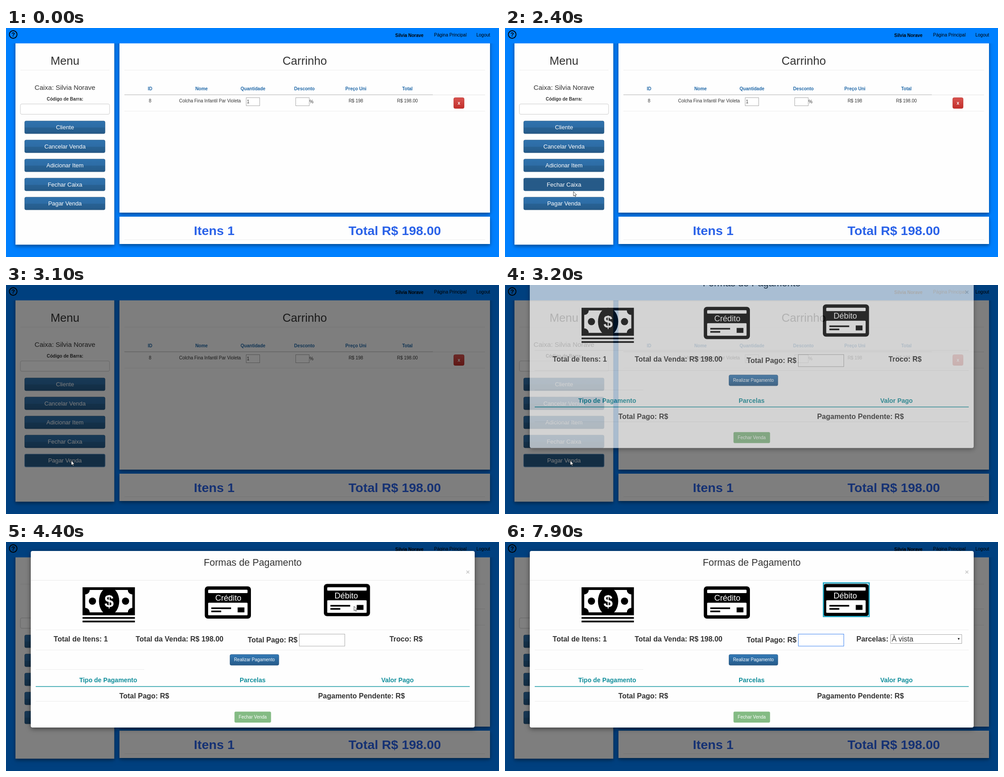
Write an HTML page that moves like this. It is 1095 px wide and 511 px high and loops after 8000 ms.

```html
<!DOCTYPE html>
<html lang="pt-BR">
<head>
<meta charset="utf-8">
<title>Caixa</title>
<style>
  html, body { margin: 0; width: 100%; height: 100%; overflow: hidden; background: #0080ff; }
  svg { display: block; width: 1095px; height: 511px; }
  text { font-family: "Liberation Sans", Arial, sans-serif; text-anchor: middle; fill: #333; white-space: pre; }
  .b { font-weight: bold; }
  .s { text-anchor: start; }
  .w { fill: #fff; }
  .k { fill: #000; }
  .link { fill: #2068a8; }
  .sum { fill: #2a62e8; }
  .teal { fill: #128f9c; }
  .panel { fill: #fefefe; filter: drop-shadow(0 3px 3px rgba(0,0,0,.3)) drop-shadow(0 3px 6px rgba(0,0,0,.2)); }
  .dialog { fill: #fefefe; filter: drop-shadow(0 3.6px 5.3px rgba(0,0,0,.5)); }
  .field { fill: #fff; stroke: #aaa; }
  .soft { fill: #fff; stroke: #ccc; }
  .menu { fill: url(#band); stroke: #245580; stroke-width: .7; }
  .menu.on { fill: #265a88; }
  .menu.focus { stroke: #5f93c4; stroke-width: 1.2; }
</style>
</head>
<body>
<svg id="stage" viewBox="0 0 1095 511"></svg>
<script>
const stage = document.getElementById('stage');

// Markup helpers
const text = (x, y, size, str, cls = '', more = '') =>
  `<text x="${x}" y="${y}" font-size="${size}" class="${cls}" ${more}>${str}</text>`;
const rect = (x, y, x2, y2, attrs) =>
  `<rect x="${x}" y="${y}" width="${x2 - x}" height="${y2 - y}" ${attrs}/>`;
const rule = (x, x2, y, color = '#ececec', w = 1) =>
  `<path d="M${x} ${y}H${x2}" stroke="${color}" stroke-width="${w}"/>`;
const gradient = (id, ...stops) =>
  `<linearGradient id="${id}" x2="0" y2="1">${stops.map(([o, c]) =>
    `<stop offset="${o}" stop-color="${c}"/>`).join('')}</linearGradient>`;

const CASHIER = 'Silvia Norave';
const ITEM = 'Colcha Fina Infantil Par Violeta';
const MENU = ['Cliente', 'Cancelar Venda', 'Adicionar Item', 'Fechar Caixa', 'Pagar Venda'];
const HEADS = ['ID', 'Nome', 'Quantidade', 'Desconto', 'Preço Uni', 'Total'];

const menuButton = (label, i) => {
  const y = 207.4 + i * 42.5;
  return rect(41.5, y, 220, y + 28.4, 'rx="3" class="menu"') + text(131, y + 18.8, 12.9, label, 'w');
};

const page = () => [
  rect(0, 0, 1095, 511, 'fill="#0080ff"'),
  rect(21, 20, 240.5, 483.5, 'class="panel"'),
  rect(252, 20, 1075, 412, 'class="panel"'),
  rect(252, 421, 1075, 482, 'class="panel"'),
  rect(0, 0, 1095, 34.3, 'fill="#0080ff"'),
  '<circle cx="16" cy="14.5" r="8.5" fill="none" stroke="#000" stroke-width="1.8"/>',
  text(16, 19.2, 13, '?', 'b k'),
  text(896, 20, 10, CASHIER, 'b k'),
  text(987, 18.7, 10, 'Página Principal', 'k'),
  text(1060, 18.7, 10, 'Logout', 'k'),

  text(131, 82, 25.67, 'Menu'),
  rule(32, 230, 94),
  text(131, 138, 14.97, 'Caixa: ' + CASHIER),
  text(131, 161.5, 10, 'Código de Barra:', 'b'),
  rect(32, 169.5, 230, 192.5, 'rx="3" class="soft"'),
  ...MENU.map(menuButton),

  text(663.5, 82, 25.67, 'Carrinho'),
  rule(263, 1064, 94),
  ...HEADS.map((h, i) => text(320 + i * 114.3, 139, 10, h, 'b link')),
  rule(263, 948, 149, '#c8c8c8', 1.4),
  rule(948, 1064, 149.3, '#e2e2e2'),
  text(320, 165.5, 10, '8'),
  text(453, 165.5, 10, ITEM),
  rect(533.5, 155.5, 563.5, 173.5, 'class="field"'),
  text(535, 168, 10, '1', 's'),
  rect(643.5, 155.5, 673.5, 173.5, 'class="field"'),
  text(678.5, 168, 10, '%'),
  text(777, 165.5, 10, 'R$ 198'),
  text(891.5, 165.5, 10, 'R$ 198.00'),
  rect(994.5, 155.5, 1017.5, 179.5, 'rx="3" fill="url(#red)" stroke="#b92c28" stroke-width=".8"'),
  text(1006, 171, 10, 'x', 'b w'),
  rule(263, 1064, 185.5),

  text(462.5, 461.5, 28.5, 'Itens 1', 'b sum'),
  text(863.5, 461.5, 28.5, 'Total R$ 198.00', 'b sum'),
  rule(263, 1064, 472.5),
].join('');

const cash = () => [
  rect(170, 101, 286.3, 163.5, ''),
  '<path class="w" d="M186 107H270.5A10 10 0 0 0 280.5 117V147A10 10 0 0 0 270.5 157H186A10 10 0 0 0 176 147V117A10 10 0 0 0 186 107Z"/>',
  '<ellipse cx="229" cy="132" rx="22.5" ry="31"/>',
  '<circle cx="192" cy="132" r="8"/><circle cx="265.5" cy="132" r="8"/>',
  text(229, 145, 37, '$', 'b w'),
  rect(170, 167.5, 286.3, 171.3, ''),
  rect(170, 175.5, 286.3, 179.3, ''),
].join('');

const card = (x, y, label, cx) => `<g transform="translate(${x} ${y})">` + [
  rect(0, 0, 102.5, 72, 'rx="7"'),
  rect(7.5, 7.5, 95, 15, 'class="w" rx="1.5"'),
  rect(7.5, 36.5, 95, 64.5, 'class="w" rx="1.5"'),
  rect(14.5, 47, 58.5, 50.6, ''),
  rect(14.5, 54, 36.5, 57.6, ''),
  rect(73, 47, 88, 58, ''),
  text(cx, 32, 18, label, 'w'),
].join('') + '</g>';

const dialog = () => [
  rect(55, 20, 1041, 414, 'rx="4" class="dialog"'),
  text(548, 53.3, 21.39, 'Formas de Pagamento'),
  text(1026, 71.5, 15, '×', 'b', 'style="fill:#c8c8c8"'),
  rule(55, 1041, 85.5, '#e8e8e8'),
  cash(),
  card(441.5, 99, 'Crédito', 52.3),
  card(706, 93.5, 'Débito', 49.7),
  rule(66, 1030, 196),
  text(166, 221.6, 15.97, 'Total de Itens: 1', 'b'),
  text(385.5, 221.6, 15.97, 'Total da Venda: R$ 198.00', 'b'),
  text(592, 224, 15.97, 'Total Pago: R$', 'b'),
  rect(651.5, 205.5, 752.5, 232.3, 'class="field" id="paid"'),
  rect(653, 210, 654, 228, 'id="caret"'),
  text(888.5, 221.6, 15.97, 'Troco: R$', 'b', 'id="change"'),
  '<g id="parcels">',
  rect(707.2, 91.3, 808.9, 166.3, 'fill="none" stroke="#1ba6c4" stroke-width="2.6"'),
  text(816, 221.6, 15.97, 'Parcelas:', 'b'),
  rect(856.5, 206.5, 1014.5, 226.5, 'class="field" id="select"'),
  text(859, 222, 15.97, 'À vista', 's'),
  '<path d="M1005.5 214.5h4.4l-2.2 4z"/></g>',
  '<g id="options">',
  rect(856.5, 226.5, 1015.5, 246.5, 'fill="#1e90ff" stroke="#7a9cc0"'),
  text(859, 242, 15.97, 'À vista', 's w'),
  '</g>',
  rule(66, 1030, 241),
  rect(497.5, 251, 606, 275, 'rx="3" fill="url(#blue)" stroke="#245580" stroke-width=".8"'),
  text(551.7, 266.2, 10, 'Realizar Pagamento', 'w'),
  rule(66, 307, 284.5),
  text(227, 313, 13.97, 'Tipo de Pagamento', 'b teal'),
  text(547.7, 313, 13.97, 'Parcelas', 'b teal'),
  text(869.5, 313, 13.97, 'Valor Pago', 'b teal'),
  rule(66, 1030, 322.5, '#1797a2', 1.4),
  text(307, 349, 15.97, 'Total Pago: R$', 'b'),
  text(789.5, 349, 15.97, 'Pagamento Pendente: R$', 'b'),
  rule(66, 1030, 355.5),
  rect(507.5, 378.5, 588.7, 403, 'rx="3" fill="#84bb84"'),
  text(548, 394.2, 10, 'Fechar Venda', 'w'),
].join('');

stage.innerHTML = '<defs>' +
  gradient('band', [0, '#2f72ad'], [.52, '#2d6ca5'], [.53, '#286294'], [.87, '#265d8d'], [1, '#245580']) +
  gradient('blue', [0, '#337ab7'], [1, '#265a88']) +
  gradient('red', [0, '#d9534f'], [1, '#c12e2a']) +
  '</defs>' + page() +
  rect(0, 0, 1095, 511, 'id="shade"') +
  `<g id="dialog">${dialog()}</g>` +
  '<path id="cursor" d="M0 0V10L2.3 8L4 11.4L5.4 10.7L3.9 7.5L7 7.3Z" fill="#fff" stroke="#222" stroke-width=".8"/>';

const el = id => document.getElementById(id);
const buttons = [...document.querySelectorAll('.menu')];
const clamp = v => Math.min(1, Math.max(0, v));
const show = (id, on) => el(id).setAttribute('visibility', on ? 'inherit' : 'hidden');
const within = (t, a, b) => t >= a && t < b;

// Pointer path: time, x, y
const PATH = [
  [200, 19, 0], [900, 390, 219], [1200, 390, 219], [2100, 162, 351], [2200, 155, 354],
  [2300, 155, 354], [2400, 152, 365], [2600, 145, 392], [3200, 145, 392], [3300, 147, 391],
  [3700, 675, 236], [4000, 773, 146], [4300, 773, 146], [4500, 773, 141], [4900, 773, 141],
  [5100, 722, 204], [5300, 757, 225], [5700, 775, 230], [5900, 860, 216], [6100, 889, 216],
  [6600, 889, 216], [6800, 879, 217], [6900, 880, 217], [7100, 780, 217], [8000, 780, 217],
];

function pointer(t) {
  const i = Math.max(1, PATH.findIndex(p => p[0] > t));
  const [t0, x0, y0] = PATH[i - 1], [t1, x1, y1] = PATH[i];
  const u = clamp((t - t0) / (t1 - t0)), e = u * u * (3 - 2 * u);
  return [x0 + (x1 - x0) * e, y0 + (y1 - y0) * e];
}

// Hover periods per menu button
const HOVER = [null, null, [1800, 2000], [2000, 2500], [2500, 3600]];

function draw(t) {
  buttons.forEach((b, i) => {
    b.classList.toggle('on', !!HOVER[i] && within(t, ...HOVER[i]));
    b.classList.toggle('focus', i === 4 && within(t, 2900, 3600));
  });

  el('shade').setAttribute('opacity', clamp((t - 2930) / 150) / 2);
  const rise = -100 * (1 - clamp((t - 3100) / 300)) ** 1.7;
  el('dialog').setAttribute('transform', `translate(0 ${rise})`);
  el('dialog').setAttribute('opacity', clamp((t - 3100) / 150));
  show('dialog', t > 3100);

  const debit = t >= 4700;
  show('change', !debit);
  show('parcels', debit);
  show('options', within(t, 6000, 6500));
  el('select').style.stroke = within(t, 6000, 7400) ? '#3b82f0' : '';
  el('paid').style.stroke = t >= 7400 ? '#3b82f0' : '';
  show('caret', within(t, 7400, 7900));

  const hidden = t < 200 || within(t, 5100, 5300) || within(t, 5800, 5900) || t >= 7400;
  show('cursor', !hidden);
  el('cursor').setAttribute('transform', `translate(${pointer(t)})`);
}

// The screen advances ten times a second
const start = performance.now();
function tick() {
  const t = (performance.now() - start) % 8000;
  draw(Math.floor(t / 100) * 100);
  requestAnimationFrame(tick);
}
tick();
</script>
</body>
</html>
```
